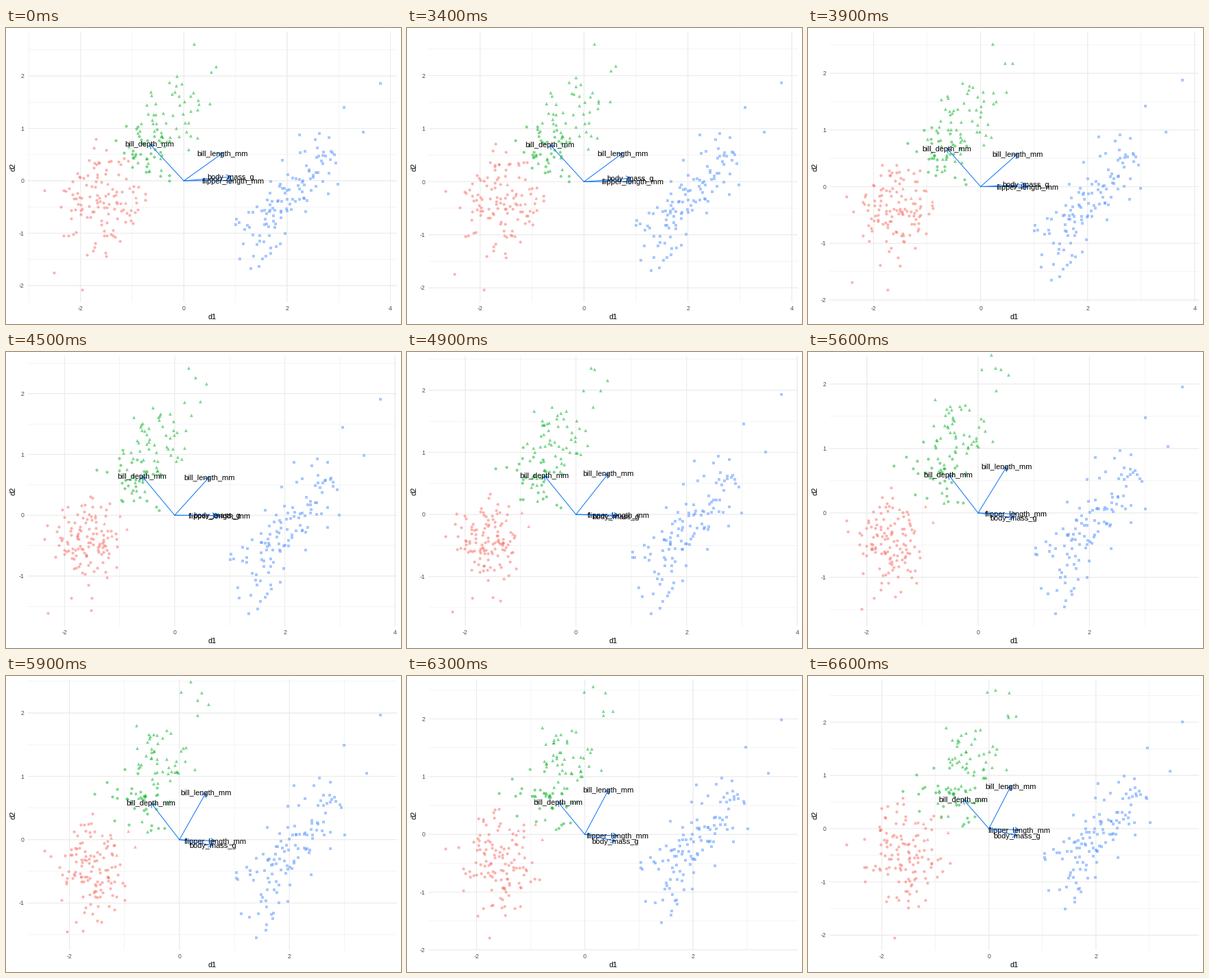
These frames come from a looping animation (576x432 px, 10 s). A matplotlib script:

```python
import matplotlib.pyplot as plt
import numpy as np
from matplotlib.animation import FuncAnimation

plt.rcParams["font.family"] = "Liberation Sans"

W, H, DPI = 576, 432, 72
LEFT, RIGHT, TOP, BOTTOM = 31.5, 570, 5.5, 400
HOLD, STEPS, FRAMES = 33, 33, 100
GRID, TICK, ARROW = "#EBEBEB", "#4D4D4D", "#1A7AF5"
RED, GREEN, BLUE = "#F8766D", "#14B632", "#619CFF"
MARKER_SIZE = {"o": 4.2, "^": 4.8, "s": 4}

rng = np.random.default_rng(8)

# Variable loadings: start x, y and end x, y
LOADINGS = {
    "bill_length_mm": (0.752, 0.529, 0.41, 0.80),
    "bill_depth_mm": (-0.661, 0.702, -0.48, 0.55),
    "flipper_length_mm": (0.955, 0.005, 0.57, -0.026),
    "body_mass_g": (0.908, 0.074, 0.525, -0.135),
}

# Points at the edge of the data, which set the view: start and end x, y
RED_EDGE = [
    (-2.70, -0.18, -1.65, -0.13), (-1.69, 0.31, -2.663, -0.30),
    (-2.387, -0.50, -2.33, -0.20), (-1.97, -2.08, -0.73, -0.65),
    (-2.52, -1.75, -1.92, -1.37), (-1.70, 0.80, -1.77, -2.05),
]
GREEN_EDGE = [
    (0.19, 2.61, 0.36, 2.09), (0.505, 1.48, 0.37, 2.556),
    (0.29, 1.46, -0.04, 2.565), (0.615, 2.19, 0.506, 2.126),
]
BLUE_EDGE = [
    (3.80, 1.86, 3.61, 2.00), (1.293, -1.68, 1.427, -1.514),
    (3.10, 1.40, 2.96, 1.515), (3.48, 0.93, 3.38, 1.076),
]


def normals(n):
    """Normal pairs with the far tails cut off."""
    z = rng.normal(size=(4 * n, 2))
    return z[np.hypot(*z.T) < 2.2][:n]


def cloud(n, start, end, spread, corr=0.0, keep=0.0):
    """Tracks from one cloud to another; keep=1 holds each point's place."""
    first = normals(n)
    last = keep * first + np.sqrt(1 - keep**2) * normals(n)
    shape = np.array([[1, corr], [0, np.sqrt(1 - corr**2)]]) * spread
    return np.hstack([start + first @ shape, end + last @ shape])


GROUPS = [
    (RED, "o", np.vstack([RED_EDGE, cloud(
        112, (-1.62, -0.38), (-1.58, -0.43), (0.41, 0.50))])),
    (RED, "^", cloud(
        5, (-1.1, -0.25), (-1.1, 0.0), (0.25, 0.2), keep=0.8)),
    (GREEN, "o", cloud(
        32, (-0.72, 0.55), (-0.72, 0.55), (0.38, 0.38), -0.5, keep=0.6)),
    (GREEN, "^", np.vstack([GREEN_EDGE, cloud(
        58, (-0.27, 1.22), (-0.37, 1.25), (0.38, 0.54), 0.5, keep=0.4)])),
    (BLUE, "s", np.vstack([
        BLUE_EDGE,
        cloud(62, (1.64, -0.78), (1.68, -0.56), (0.36, 0.40), 0.45, keep=0.96),
        cloud(53, (2.50, 0.17), (2.47, 0.30), (0.36, 0.44), 0.4, keep=0.96)])),
]
EDGE = np.array(RED_EDGE + GREEN_EDGE + BLUE_EDGE)

fig = plt.figure(figsize=(W / DPI, H / DPI), dpi=DPI, facecolor="white")
ax = fig.add_axes([0, 0, 1, 1])


def between(tracks, t):
    tracks = np.asarray(tracks)
    return tracks[..., :2] * (1 - t) + tracks[..., 2:] * t


def label(x, y, text, size, color="black", ha="center", rotation=0):
    """Text centred on its cap height."""
    drop = 0.36 * size
    dx, dy = (drop, 0) if rotation else (0, drop)
    ax.text(x + dx, y + dy, text, size=size, color=color, ha=ha,
            va="baseline", rotation=rotation, rotation_mode="anchor")


def draw_grid(low, high, to_px):
    for step, width in ((0.5, 0.53), (1, 1.07)):
        xs = np.arange(-6, 7) * 2 * step
        ys = np.arange(-6, 7) * step
        xs = xs[(xs > low[0]) & (xs < high[0])]
        ys = ys[(ys > low[1]) & (ys < high[1])]
        px = [to_px((x, 0))[0] for x in xs]
        py = [to_px((0, y))[1] for y in ys]
        style = dict(colors=GRID, linewidths=width, zorder=1, snap=False)
        ax.vlines(px, TOP, BOTTOM, **style)
        ax.hlines(py, LEFT, RIGHT, **style)
    for x, p in zip(xs, px):
        label(p, 409, f"{x:.0f}", 8.8, TICK)
    for y, p in zip(ys, py):
        label(26.6, p, f"{y:.0f}", 8.8, TICK, ha="right")
    label(300.7, 421.3, "d1", 11)
    label(10, 203, "d2", 11, rotation=90)


def draw_arrow(tail, tip):
    back = np.arctan2(*(tail - tip)[::-1])
    barbs = [tip + 7.2 * np.array([np.cos(a), np.sin(a)])
             for a in (back - np.pi / 6, back + np.pi / 6)]
    for path in ([tail, tip], [barbs[0], tip, barbs[1]]):
        ax.plot(*np.array(path).T, color=ARROW, lw=1.07, zorder=3, snap=False)


def draw(frame):
    t = np.clip(frame - HOLD, 0, STEPS) / STEPS
    ax.clear()
    ax.set(xlim=(0, W), ylim=(H, 0))
    ax.axis("off")

    # The view follows the range of the data, with 5 % padding
    edge = between(EDGE, t)
    low, high = edge.min(axis=0), edge.max(axis=0)
    pad = 0.05 * (high - low)
    low, high = low - pad, high + pad

    def to_px(points):
        share = (np.asarray(points) - low) / (high - low)
        return np.array([LEFT, BOTTOM]) + share * [RIGHT - LEFT, TOP - BOTTOM]

    draw_grid(low, high, to_px)
    for color, marker, tracks in GROUPS:
        x, y = to_px(between(tracks, t)).T
        ax.scatter(x, y, s=MARKER_SIZE[marker]**2, c=color, marker=marker,
                   alpha=0.55, linewidths=0, zorder=2)

    origin = to_px((0, 0))
    for name, track in LOADINGS.items():
        tip = to_px(between(track, t))
        draw_arrow(origin, tip)
        label(*tip, name, 11)
    return []


anim = FuncAnimation(fig, draw, frames=FRAMES, interval=100,
                     init_func=lambda: [], repeat=True, repeat_delay=0)
plt.show()
```
